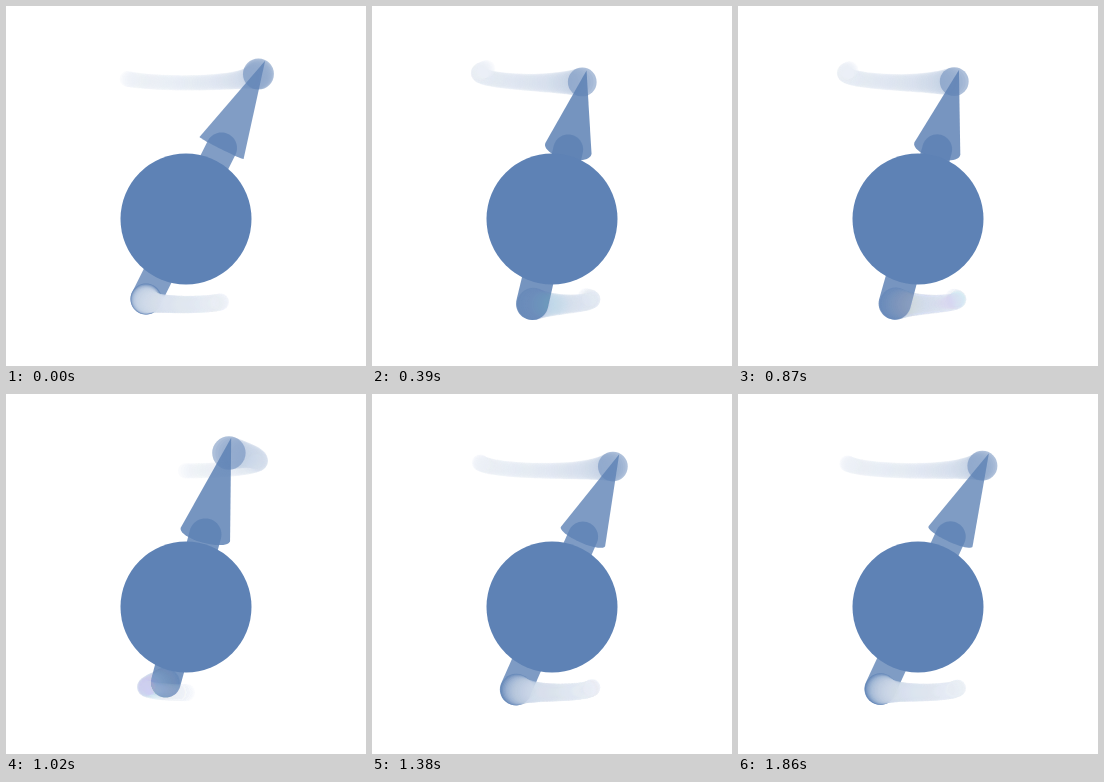
Animation, 360 px wide and 360 px high, one loop 1.89 s. Source, as an HTML page with a canvas:

```html
<!DOCTYPE html>
<html lang="en">
<head>
<meta charset="utf-8">
<title>Precessing spin</title>
<style>
html, body { margin: 0; width: 100%; height: 100%; overflow: hidden; background: #fff; }
canvas { display: block; width: 360px; height: 360px; }
</style>
</head>
<body>
<canvas id="stage" width="360" height="360"></canvas>
<script>
const ctx = document.getElementById('stage').getContext('2d');
const TAU = Math.PI * 2, DEG = Math.PI / 180;
const LOOP = 1890, STEP = 30, TURNS = 4;
const CX = 180, CY = 213, DEPTH = 840, TILT = 0.037;
const BASE = [94, 130, 181];
const TRAIL = 64, TRAIL_ARC = 147 * DEG;
const LEAD = 1.1 * DEG, LAG = 1 * DEG;
const TIP = 158, TIP_DOT = 145, NECK = 71, TAIL = -80;

const tint = (white, alpha) =>
  `rgba(${BASE.map(c => Math.round(c + (255 - c) * white)).join(',')},${alpha})`;

// y points up, z points to the viewer
function project([x, y, z]) {
  const s = DEPTH / (DEPTH - z);
  return { x: CX + x * s, y: CY - y * s + z * TILT, s, z };
}

// point on the tilted axis at height h
const onAxis = (h, a) => [h / 2 * Math.cos(a), h, h / 2 * Math.sin(a)];

function dot(p, r, fill) {
  ctx.fillStyle = fill;
  ctx.beginPath();
  ctx.arc(p.x, p.y, r, 0, TAU);
  ctx.fill();
}

const circlePoints = (p, r) => Array.from({ length: 48 }, (_, i) => ({
  x: p.x + r * Math.cos(i / 48 * TAU),
  y: p.y + r * Math.sin(i / 48 * TAU)
}));

function hull(points) {
  const sorted = [...points].sort((a, b) => a.x - b.x || a.y - b.y);
  const half = list => {
    const out = [];
    for (const p of list) {
      while (out.length > 1) {
        const a = out[out.length - 2], b = out[out.length - 1];
        if ((b.x - a.x) * (p.y - a.y) - (b.y - a.y) * (p.x - a.x) > 0) break;
        out.pop();
      }
      out.push(p);
    }
    return out.slice(0, -1);
  };
  return [...half(sorted), ...half(sorted.reverse())];
}

function fillHull(points, fill) {
  ctx.fillStyle = fill;
  ctx.beginPath();
  hull(points).forEach(p => ctx.lineTo(p.x, p.y));
  ctx.fill();
}

function drawTrail(h, angle, alpha = 1) {
  const dots = [];
  for (let i = 0; i <= TRAIL; i++) {
    const u = i / TRAIL;
    const p = project(onAxis(h, angle - LAG - u * TRAIL_ARC));
    const r = (8.3 + 7.2 * (1 - u) ** 5) * p.s;
    const fill = i === 0 ? tint(0, 0.5) : tint(0.57 + 0.31 * Math.sqrt(u), 0.26);
    dots.push({ p, r, fill });
  }
  ctx.globalAlpha = alpha;
  dots.sort((a, b) => a.p.z - b.p.z).forEach(d => dot(d.p, d.r, d.fill));
  ctx.globalAlpha = 1;
}

function drawRod(angle, fill) {
  const ends = [NECK, TAIL].map(h => project(onAxis(h, angle)));
  fillHull(ends.flatMap(p => circlePoints(p, 15.5 * p.s)), fill);
}

function drawCone(angle, fill) {
  const c = Math.cos(angle), s = Math.sin(angle), k = Math.sqrt(5);
  const side = [-s, 0, c];
  const up = [2 * c / k, -1 / k, 2 * s / k];
  const mid = onAxis(NECK, angle);
  const points = [project(onAxis(TIP, angle))];
  for (let i = 0; i < 48; i++) {
    const a = i / 48 * TAU;
    points.push(project(mid.map((m, j) =>
      m + 24.6 * (side[j] * Math.cos(a) + up[j] * Math.sin(a)))));
  }
  fillHull(points, fill);
}

function draw(time) {
  const angle = time / LOOP * TURNS * TAU + LEAD / 2;
  const lean = Math.cos(angle);
  const body = tint(0, Math.min(1, 0.92 - 0.14 * lean));
  // each trail shows over the body while its end recedes
  const over = x => Math.max(0, x) ** 4;

  ctx.clearRect(0, 0, 360, 360);
  drawTrail(TIP_DOT, angle);
  drawTrail(TAIL, angle);
  drawRod(angle + LEAD / 2, body);
  drawTrail(TAIL, angle, over(lean));
  drawCone(angle + LEAD / 2, body);
  drawTrail(TIP_DOT, angle, over(-lean));
  dot({ x: CX, y: CY }, 65.5, tint(0, 1));
}

const start = performance.now();
function tick() {
  const t = (performance.now() - start) % LOOP;
  draw(Math.floor(t / STEP) * STEP);
  requestAnimationFrame(tick);
}
tick();
</script>
</body>
</html>
```
